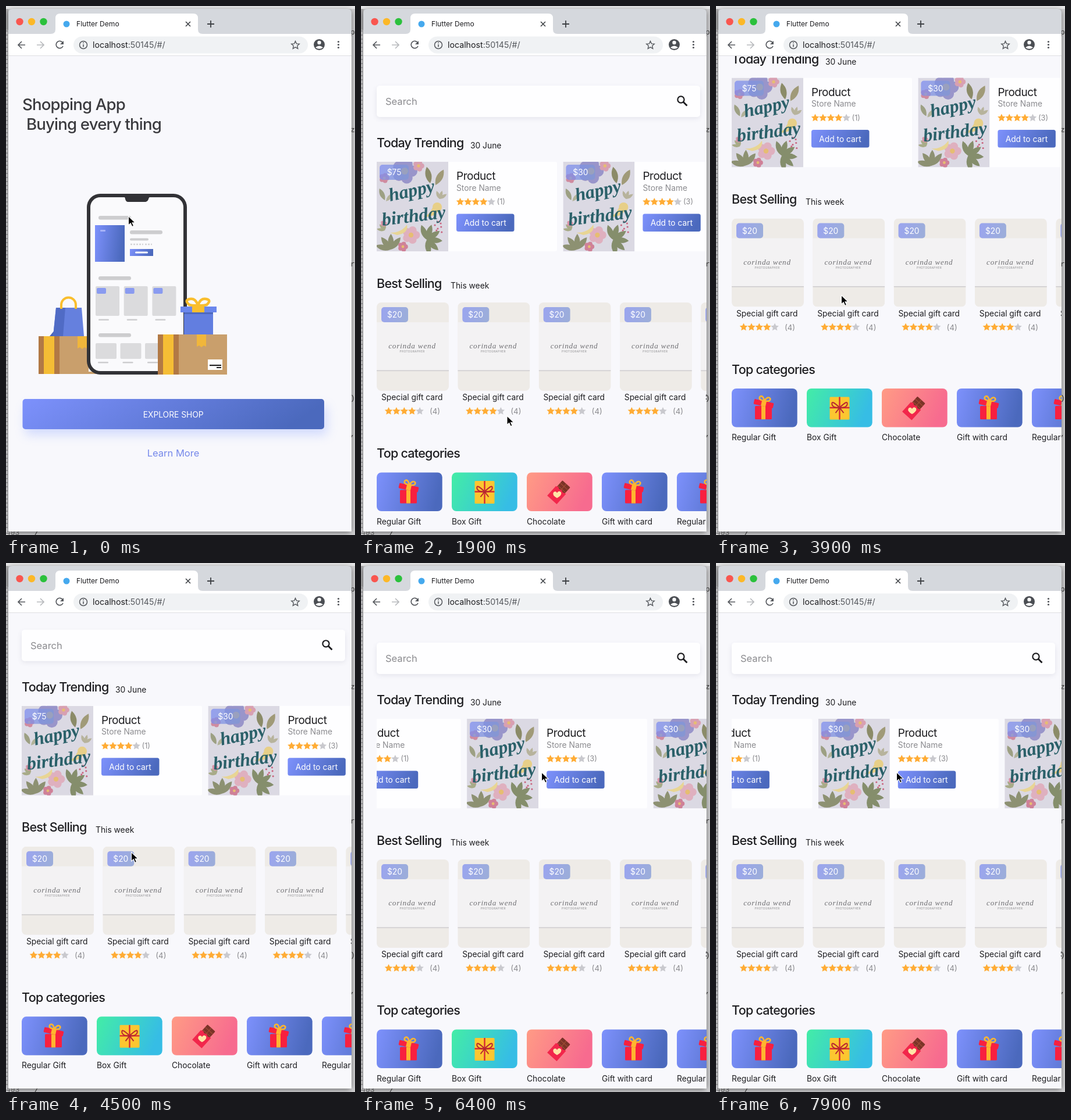
An HTML page for the animation above (8 s loop, 600 by 910 pixels).

```html
<!DOCTYPE html>
<html lang="en">
<head>
<meta charset="utf-8">
<title>Shopping app</title>
<style>
html, body { margin: 0; width: 100%; height: 100%; overflow: hidden; background: #cdcdcf; }
svg { display: block; width: 600px; height: 910px; }
text { font-family: Inter, Roboto, sans-serif; font-size: 13.8px; fill: #1d1d20; white-space: pre; }
.head { font-size: 21.5px; font-weight: 450; letter-spacing: -.034em; }
.hero { font-size: 27.6px; font-weight: 500; letter-spacing: -.03em; fill: #3b3b3f; }
.soft { fill: #8b8b8f; }
.light { fill: #fff; }
.script { font: italic 600 32px "Liberation Serif", serif; fill: #2a6069; }
.sign { font: italic 13.2px "Liberation Serif", serif; letter-spacing: .06em; fill: #707074; }
.code { font: 13px "Liberation Mono", monospace; fill: #333; }
</style>
</head>
<body>
<svg id="stage" viewBox="0 0 600 910" xmlns="http://www.w3.org/2000/svg"></svg>
<script>
const LOOP = 8000;
const range = n => [...Array(n).keys()];
const rect = (x, y, w, h, fill, r = 0, extra = '') =>
  `<rect x="${x}" y="${y}" width="${w}" height="${h}" rx="${r}" fill="${fill}" ${extra}/>`;
const circle = (x, y, r, fill) => `<circle cx="${x}" cy="${y}" r="${r}" fill="${fill}"/>`;
const path = (d, fill, extra = '') => `<path d="${d}" fill="${fill}" ${extra}/>`;
const line = (d, color, width, extra = '') =>
  `<path d="${d}" fill="none" stroke="${color}" stroke-width="${width}" ${extra}/>`;
const text = (x, y, s, cls = '', extra = '') => `<text x="${x}" y="${y}" class="${cls}" ${extra}>${s}</text>`;
const at = (x, y, body, extra = '') => `<g transform="translate(${x} ${y})" ${extra}>${body}</g>`;
const turn = (x, y, angle, body) => `<g transform="translate(${x} ${y}) rotate(${angle})">${body}</g>`;
const gradient = (id, from, to, tilt = 0) =>
  `<linearGradient id="${id}" x2="1" y2="${tilt}"><stop stop-color="${from}"/><stop offset="1" stop-color="${to}"/></linearGradient>`;
const clip = (id, x, y, w, h, r = 0) => `<clipPath id="${id}">${rect(x, y, w, h, '#000', r)}</clipPath>`;
const blur = (id, amount) =>
  `<filter id="${id}" x="-20%" y="-50%" width="140%" height="220%"><feGaussianBlur stdDeviation="${amount}"/></filter>`;

function star(cx, cy, fill) {
  const points = range(10).map(i => {
    const r = i % 2 ? 3.5 : 7.1, a = i * Math.PI / 5 - Math.PI / 2;
    return `${(cx + r * Math.cos(a)).toFixed(1)},${(cy + r * Math.sin(a)).toFixed(1)}`;
  });
  return `<polygon points="${points.join(' ')}" fill="${fill}"/>`;
}
const stars = (x, y) => range(5).map(i => star(x + i * 13.4, y, i < 4 ? '#ffac35' : '#c9c9ce')).join('');

const badge = (x, y, w, price) =>
  rect(x, y, w, 26, 'url(#tag)', 5, 'opacity=".74"') + text(x + w / 2, y + 18, price, 'light', 'text-anchor="middle"');

function backdrop() {
  const marks = [['p', 49], ['z', 217], ['r', 448], [')', 678], [',', 740]];
  return rect(0, 0, 600, 910, '#cdcdcf') + rect(0, 0, 600, 5, '#e6e6e7') +
    rect(0, 5, 4, 36, '#a9a9ab') + line('M1.5 42V900', '#8e8e91', 2, 'stroke-dasharray="2 5"') +
    marks.map(([s, y]) => text(592, y, s, 'code')).join('') +
    text(0, 910, '403', 'code', 'opacity=".65"') + text(47, 913, '/', 'code') +
    rect(4, 7, 590, 899, '#000', 7, 'opacity=".45" filter="url(#near)"');
}

function browser() {
  const lights = ['#f9564f', '#fcb827', '#2bc13c'].map((c, i) => circle(23.5 + 20.5 * i, 27, 6.2, c)).join('');
  const ink = '#55585d';
  return path('M4 86V12Q4 5 11 5H587Q594 5 594 12V86Z', '#d5d8dd') +
    path('M77 48Q85 48 85 40V21Q85 13 93 13H322Q330 13 330 21V40Q330 48 338 48Z', '#fff') +
    rect(4, 48, 590, 37.5, '#fff') + rect(4, 85, 590, 1, '#dedee2') + lights +
    circle(104, 31, 5.5, '#45a9ee') +
    text(121, 35, 'Flutter Demo', '', 'style="font-size:12.1px"') +
    line('M309 27l8 8m0-8l-8 8', '#3d4044', 1.6) + line('M346 31h12m-6-6v12', '#3d4044', 1.8) +
    line('M33 67H21m6-6l-6 6 6 6', ink, 1.7) + line('M53 67h12m-6-6l6 6-6 6', '#b8babd', 1.7) +
    line('M97.5 63A6.2 6.2 0 1 0 98 69', ink, 1.7) + path('M99 60v6h-6z', ink) +
    rect(116, 52.5, 403, 29, '#f0f2f4', 14.5) +
    `<circle cx="133" cy="67" r="6.5" fill="none" stroke="${ink}" stroke-width="1.5"/>` +
    line('M133 66v4.5m0-8v1.8', ink, 1.6) +
    text(149, 72, 'localhost<tspan fill="#55585d">:50145/#/</tspan>', '', 'style="font-size:14.2px"') +
    line('M497.5 60.5l2 4.4 4.8.5-3.6 3.2 1 4.7-4.2-2.4-4.2 2.4 1-4.7-3.6-3.2 4.8-.5z', ink, 1.4) +
    circle(538.5, 66.5, 9.5, '#4b4e53') + circle(538.5, 63, 3.2, '#fff') +
    path('M532 71.5Q538.5 65.5 545 71.5Q538.5 76 532 71.5Z', '#fff') +
    [61.5, 66.5, 71.5].map(y => circle(571.5, y, 1.6, ink)).join('');
}

function carton(x, y, w, h) {
  const tan = '#c99f6c', dark = '#b27945';
  return at(x, y, rect(0, 0, w, h, tan) + rect(0, 0, 36, h, dark) + rect(9, 0, 18, h, '#f5bd35') +
    path('M67 0h16v21l-4-2-4 3-4-3-4 2z', '#f0b63b') + rect(86, 43, 25, 18, '#fff') +
    rect(89, 52, 20, 2.2, '#222') + rect(101, 56, 8, 2, '#222'));
}

function phone() {
  const bar = (x, y, w, h = 6.5) => rect(x, y, w, h, '#cdcdcf', h / 2);
  const tiles = range(3).map(i => {
    const x = 154 + i * 48.7, low = 154 + i * 42.5;
    return rect(x, 482, 41, 51, '#dbdbdd', 2) + rect(x + 2, 485, 16, 10, '#8a9bf0', 2) + bar(x + 5, 538.5, 18, 2.5) +
      rect(low, 580, 36, 27, '#dbdbdd', 2) + bar(low + 4, 612, 18, 2.5);
  }).join('');
  return rect(139, 323, 172, 311, '#323236', 23) + rect(145, 329, 160, 299, '#fafafc', 17) +
    path('M201 328h48q-3 0-4 4t-5 5h-30q-4 0-5-5t-4-4z', '#323236') +
    bar(159, 361, 56) + rect(153, 377, 51, 63, 'url(#blue)') + rect(162, 385, 9, 3, '#a7b3f7', 1) +
    bar(213, 386, 56) + bar(213, 399.5, 32, 4) + line('M214 410h22m3 0h12', '#d4d4d6', 2.5, 'stroke-dasharray="3 2"') +
    rect(213, 418, 40, 12, 'url(#blue)') + rect(222, 422.5, 22, 3, '#fff', 1.5) +
    bar(159, 465, 56) + bar(159, 563, 56) + tiles;
}

function intro() {
  const bag = path('M75 568l10-12v12z', '#4962b8') + path('M86 519h44l4 49H81z', '#6580de') +
    path('M86 519h16l-4 49H81z', '#506bc5') +
    line('M95 521v-7a12.5 12.5 0 0 1 25 0v7', '#f9be2e', 4);
  const present = rect(306, 526, 50, 39, '#627ee0') + rect(300, 517, 62, 10, '#6b87ec') + rect(306, 527, 50, 3, '#4e69bd') +
    rect(320, 517, 21, 10, '#f9be2e') +
    line('M330 515q-4-13-14-11t-1 10q7 2 15 1q4-13 14-11t1 10q-7 2-15 1', '#f9be2e', 4.5);
  return rect(4, 86, 590, 818, '#f8f8fc') +
    text(28, 179, 'Shopping App', 'hero') + text(35, 213, 'Buying every thing', 'hero') +
    carton(56, 568, 119, 65) + bag + phone() + present + carton(261, 565, 119, 69) +
    rect(33, 688, 519, 50, '#8ca4ff', 6, 'opacity=".35" filter="url(#far)"') +
    rect(28.5, 676, 518.5, 52, 'url(#blue)', 5) +
    text(287.7, 707.5, 'EXPLORE SHOP', 'light', 'text-anchor="middle"') +
    text(287.5, 775, 'Learn More', '', 'text-anchor="middle" style="font-size:16.5px;fill:#7588ea"');
}

function greeting() {
  const leaf = (x, y, angle, size, color) =>
    turn(x, y, angle, path(`M0 0Q${size * .36} ${-size * .5} 0 ${-size}Q${-size * .36} ${-size * .5} 0 0`, color));
  const spray = (x, y, start, n, size, color) => range(n).map(i => leaf(x, y, start + i * 38, size, color)).join('');
  const flower = (x, y, r, color) =>
    range(5).map(i => circle(x + r * .6 * Math.cos(i * 1.257), y + r * .6 * Math.sin(i * 1.257), r * .5, color)).join('') +
    circle(x, y, r * .3, '#e6bd72');
  const berries = range(7).map(i => circle(106 + 6 * Math.sin(i * 2.4), 103 + i * 3, 1.6, '#c9657f')).join('');
  const art = rect(0, 0, 123, 154, '#dbd9e3') +
    leaf(92, 37, -12, 29, '#8b8b68') + leaf(101, 40, 28, 30, '#a09a78') + leaf(14, 66, -25, 22, '#9da083') +
    leaf(16, 68, 40, 18, '#b3b39a') + spray(108, 64, -20, 3, 15, '#b7b39c') +
    spray(24, 151, -75, 4, 27, '#8d9172') + spray(86, 134, -20, 6, 27, '#858e6c') +
    spray(14, 118, -80, 3, 14, '#a8ab88') +
    flower(48, 16, 20, '#9995ca') + flower(72, 7, 9, '#d8a0b2') + flower(13, 28, 8, '#cf8ba0') +
    flower(59, 126, 14, '#dfb0bf') + flower(45, 146, 8, '#cf8198') + flower(12, 106, 5, '#d792a6') +
    circle(104, 78, 8, '#e7cf88') + path('M96 79q-6 14-17 15q18 4 29-12z', '#e7cf88') +
    path('M23 122q20 0 29-14q3 15-17 18z', '#e8d594') + berries +
    turn(23, 68, -12, text(0, 0, 'happy', 'script')) + turn(10, 110, -7, text(0, 0, 'birthday', 'script'));
  return `<g clip-path="url(#artShape)">${art}</g>`;
}

function product(i, price, votes) {
  return at(27 + 320.4 * i, 268,
    rect(0, 0, 310, 154, '#fefeff', 3) + greeting() + badge(5, 5, 50, price) +
    text(137, 31, 'Product', '', 'style="font-size:19px;letter-spacing:-.025em"') +
    text(137, 49.5, 'Store Name', 'soft') + stars(143.5, 69) + text(206.5, 73, `(${votes})`, 'soft', 'style="font-size:12.8px"') +
    rect(137, 89.5, 99.5, 30.5, 'url(#blue)', 3.5) + text(186.5, 110, 'Add to cart', 'light', 'text-anchor="middle"'));
}

function giftCard(i) {
  return at(27 + 139.3 * i, 510,
    at(0, 0, rect(0, 0, 124, 152, '#eeebe7') + rect(0, 34, 124, 83, '#f3f2f3') + rect(0, 116.5, 124, 1.6, '#cfcdcf'),
      'clip-path="url(#cardShape)"') +
    text(61, 79, 'corinda wend', 'sign', 'text-anchor="middle"') +
    text(61, 86, 'PHOTOGRAPHER', '', 'text-anchor="middle" style="font-size:4.6px;letter-spacing:.1em;fill:#88888b"') +
    badge(8, 8, 46, '$20') + text(60.7, 168, 'Special gift card', '', 'text-anchor="middle"') +
    stars(20.5, 187) + text(91, 192, '(4)', 'soft', 'style="font-size:13.2px"'));
}

const icons = {
  gift: rect(40, 30, 29, 23, '#f8203f', 1.5) + rect(51, 30, 7, 23, '#ffb52f') +
    turn(55, 26, 13, rect(-17, -4.5, 34, 9, '#f8203f', 1.5) + rect(-4, -4.5, 8, 9, '#ffb52f') +
      line('M0-5q-11 1-9-5q4-5 9 5q4-10 9-6q2 6-9 6', '#ffb52f', 2.6)),
  box: rect(39.5, 14.5, 34, 39, '#fcc630', 1.5) + line('M56.5 14.5v39M39.5 33h34', '#d62b34', 2.4) +
    line('M56.5 33q-15-15-13-5q3 6 13 5q15-15 13-5q-3 6-13 5l-7 9m7-9l7 9', '#b72730', 2),
  bar: turn(56, 33, 42, rect(-9, -18, 18, 20, '#7b3328', 1) + line('M0-18V0M-9-12H9M-9-6H9', '#a04d35', 1.2) +
    path('M-11-3l4-2 4 2 4-2 4 2 6-2V19H-11z', '#f2264b')) +
    path('M52 44q-9-5-6-10 4-3 6 1 3-5 7-1 2 5-7 10', '#ffe3a6')
};

const category = ([label, icon, fill], i) => at(27 + 129 * i, 802.5,
  rect(0, 0, 112.7, 66.5, `url(#${fill})`, 8) + icons[icon] + text(0, 89, label));

function shop() {
  const products = [['$75', 1], ['$30', 3], ['$30', 3]].map(([price, votes], i) => product(i, price, votes)).join('');
  const categories = [['Regular Gift', 'gift', 'blue'], ['Box Gift', 'box', 'green'], ['Chocolate', 'bar', 'coral'],
    ['Gift with card', 'gift', 'blue'], ['Regular Gift', 'gift', 'blue']].map(category).join('');
  return rect(4, 86, 590, 818, '#f8f8fc') + '<g id="list">' +
    rect(27, 141, 556, 52, '#59597a', 5, 'opacity=".13" filter="url(#near)"') + rect(27, 137, 556, 54, '#fefeff', 5) +
    text(42, 170, 'Search', 'soft', 'style="font-size:16.5px"') +
    '<circle cx="550" cy="161" r="5.6" fill="none" stroke="#1b1b1e" stroke-width="2.2"/>' + line('M554 165l6.5 6.5', '#1b1b1e', 2.8) +
    text(27, 243, 'Today Trending', 'head') + text(188, 245, '30 June') +
    `<g clip-path="url(#rowShape)"><g id="row">${products}</g></g>` +
    text(27, 484.5, 'Best Selling', 'head') + text(154, 486, 'This week') + range(5).map(giftCard).join('') +
    text(27, 777, 'Top categories', 'head') + categories + '</g>';
}

const defs = gradient('blue', '#7d91fc', '#4b69bd', .15) + gradient('tag', '#7d8cf2', '#7f97d6', .15) +
  gradient('green', '#43eda6', '#36bde5', .25) + gradient('coral', '#ff9b85', '#f76b8f', .25) +
  blur('near', 4) + blur('far', 9) + clip('view', 4, 86, 590, 818) + clip('rowShape', 27, 260, 567, 170) +
  clip('cardShape', 0, 0, 124, 152, 8) + clip('artShape', 0, 0, 123, 154);

const stage = document.getElementById('stage');
stage.innerHTML = `<defs>${defs}</defs>${backdrop()}
  <g clip-path="url(#view)"><g id="intro">${intro()}</g><g id="shop">${shop()}</g></g>${browser()}
  <g id="cursor">${path('M0 0V15.5L3.7 12.2L6.3 18L9 16.8L6.5 11.2H11.5Z', '#000',
    'stroke="#fff" stroke-width="1.1"')}</g>`;

const smooth = p => p * p * (3 - 2 * p);
const settle = p => 1 - (1 - p) ** 3;

// Keys are [time, value...]; values hold between equal neighbours.
function track(keys, t, ease) {
  const next = keys.findIndex(k => k[0] > t);
  if (next < 0) return keys[keys.length - 1].slice(1);
  const a = keys[Math.max(0, next - 1)], b = keys[next];
  const p = a === b ? 0 : ease((t - a[0]) / (b[0] - a[0]));
  return a.slice(1).map((v, i) => v + (b[i + 1] - v) * p);
}

const pointer = [[0, 210.5, 361.5], [200, 210.5, 361.5], [1000, 251, 705], [2200, 251, 705], [3000, 215.5, 497.5],
  [4700, 215.5, 497.5], [5200, 311.5, 372.5], [5300, 311.5, 372.5], [5600, 310.5, 360]];
const pageTurn = [[1250, 0], [1650, 1]];
const listScroll = [[3400, 0], [3800, 144.5], [4200, 144.5], [4600, 0]];
const rowScroll = [[5600, 0], [6800, 171.6]];

const move = (id, x, y) => document.getElementById(id).setAttribute('transform', `translate(${x} ${y})`);

function update(t) {
  const [turned] = track(pageTurn, t, settle);
  move('intro', -197 * turned, 0);
  move('shop', 590 * (1 - turned), 0);
  move('list', 0, -track(listScroll, t, smooth)[0]);
  move('row', -track(rowScroll, t, settle)[0], 0);
  move('cursor', ...track(pointer, t, smooth));
}

const start = performance.now();
function tick() {
  update((performance.now() - start) % LOOP);
  requestAnimationFrame(tick);
}
update(0);
requestAnimationFrame(tick);
</script>
</body>
</html>
```
